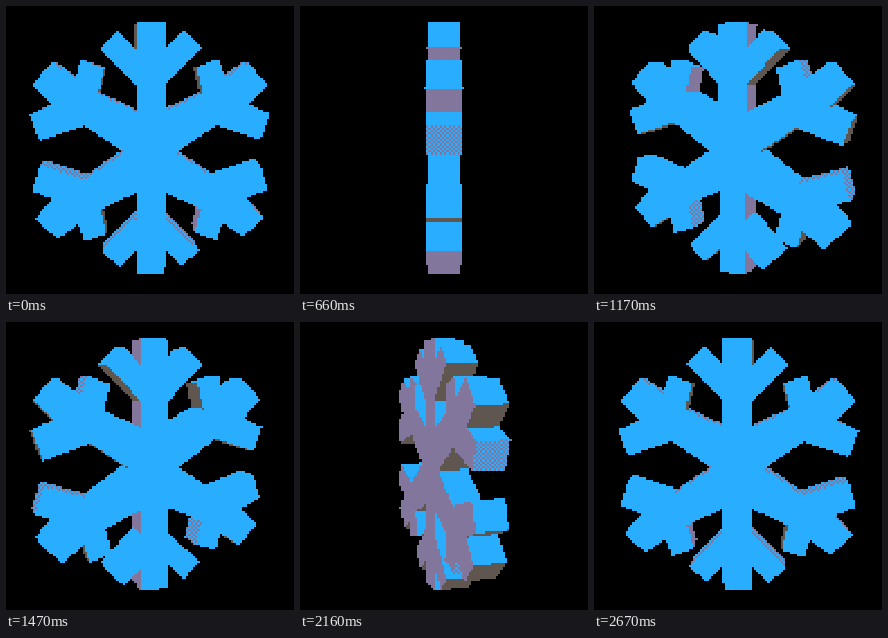
An HTML page with a canvas for the animation above (2.7 s loop, 288 by 288 pixels).

```html
<!DOCTYPE html>
<html lang="en">
<head>
<meta charset="utf-8">
<title>Snowflake</title>
<style>
  html, body { margin: 0; width: 100%; height: 100%; overflow: hidden; background: #000; }
  canvas { display: block; width: 288px; height: 288px; image-rendering: pixelated; }
</style>
</head>
<body>
<canvas id="stage" width="128" height="128"></canvas>
<script>
const SIZE = 128, UNIT = 2.25, LOOP = 2700, STEP = 30;
const CAMERA = 560, DEPTH = 15, PITCH = 0.153;
const BLACK = 0xff000000, BLUE = 0xffffad29, LAVENDER = 0xff9c7683, GRAY = 0xff4f575f;

const ctx = document.getElementById('stage').getContext('2d');
const image = ctx.createImageData(SIZE, SIZE);
const pixels = new Uint32Array(image.data.buffer);
const nearest = new Float32Array(SIZE * SIZE);

// Upper right quarter of the flake, clockwise from the top; the rest is mirrored.
const quarter = [
  [14.2, 123.5], [14.2, 99.2], [31.5, 116.5], [48.3, 99.7], [14.2, 65.6], [14.2, 40],
  [50, 57], [44, 81.5], [66, 89], [71.5, 71.5], [92.5, 86.5], [113, 66],
  [94.5, 46.5], [116, 37.5], [107.5, 12], [64, 26.5], [25, 0]
];
const right = [...quarter, ...quarter.slice(0, -1).reverse().map(([x, y]) => [x, -y])];
const outline = [...right, ...right.slice().reverse().map(([x, y]) => [-x, y])];

const cp = Math.cos(PITCH), sp = Math.sin(PITCH);
let cy = 1, sy = 0;

function project([x, y], z) {
  const rx = x * cy + z * sy;
  const rz = z * cy - x * sy;
  const near = 1 / (CAMERA - rz * cp - y * sp);
  const scale = CAMERA * near / UNIT;
  return { x: SIZE / 2 + rx * scale, y: SIZE / 2 - (y * cp - rz * sp) * scale, near };
}

// Light comes from above and from the viewer: [odd pixel, even pixel].
function shade(nx, ny, nz) {
  const light = 0.6 * ny + 0.8 * (nz * cy - nx * sy);
  if (light > 0.57) return [BLUE, BLUE];
  if (light > 0.36) return [BLUE, LAVENDER];
  return light > 0.14 ? [LAVENDER, LAVENDER] : [GRAY, GRAY];
}

// Even-odd scanline fill with a depth test; 1/depth is linear on screen.
function fill(points, [p, q, r], colors) {
  const ax = q.x - p.x, ay = q.y - p.y, bx = r.x - p.x, by = r.y - p.y;
  const det = ax * by - ay * bx;
  if (Math.abs(det) < 1e-6) return;
  const qa = q.near - p.near, rb = r.near - p.near;
  const gx = (qa * by - rb * ay) / det, gy = (rb * ax - qa * bx) / det;
  const ys = points.map(v => v.y);
  const top = Math.max(0, Math.ceil(Math.min(...ys) - 0.5));
  const bottom = Math.min(SIZE - 1, Math.floor(Math.max(...ys) - 0.5));
  for (let row = top; row <= bottom; row++) {
    const y = row + 0.5, hits = [];
    points.forEach((a, i) => {
      const b = points[(i + 1) % points.length];
      if ((a.y <= y) !== (b.y <= y)) hits.push(a.x + (y - a.y) * (b.x - a.x) / (b.y - a.y));
    });
    hits.sort((a, b) => a - b);
    for (let i = 0; i + 1 < hits.length; i += 2) {
      for (let col = Math.ceil(hits[i] - 0.5); col + 0.5 < hits[i + 1]; col++) {
        const near = p.near + gx * (col + 0.5 - p.x) + gy * (y - p.y);
        const at = row * SIZE + col;
        if (near > nearest[at]) {
          nearest[at] = near;
          pixels[at] = colors[(row + col) & 1];
        }
      }
    }
  }
}

function draw(time) {
  const step = Math.floor((time % LOOP) / STEP);
  const angle = (step + 0.5) * STEP / LOOP * 2 * Math.PI;
  cy = Math.cos(angle);
  sy = Math.sin(angle);
  pixels.fill(BLACK);
  nearest.fill(0);

  const front = outline.map(v => project(v, DEPTH));
  const back = outline.map(v => project(v, -DEPTH));
  outline.forEach(([x, y], i) => {
    const j = (i + 1) % outline.length;
    const dx = outline[j][0] - x, dy = outline[j][1] - y, len = Math.hypot(dx, dy);
    if (!len) return;
    fill([front[i], front[j], back[j], back[i]], [front[i], front[j], back[j]],
      shade(-dy / len, dx / len, 0));
  });
  const third = Math.floor(outline.length / 3);
  for (const [cap, nz] of [[front, 1], [back, -1]]) {
    fill(cap, [cap[0], cap[third], cap[2 * third]], shade(0, 0, nz));
  }
  ctx.putImageData(image, 0, 0);
}

function tick() {
  draw(performance.now());
  requestAnimationFrame(tick);
}
tick();
</script>
</body>
</html>
```
